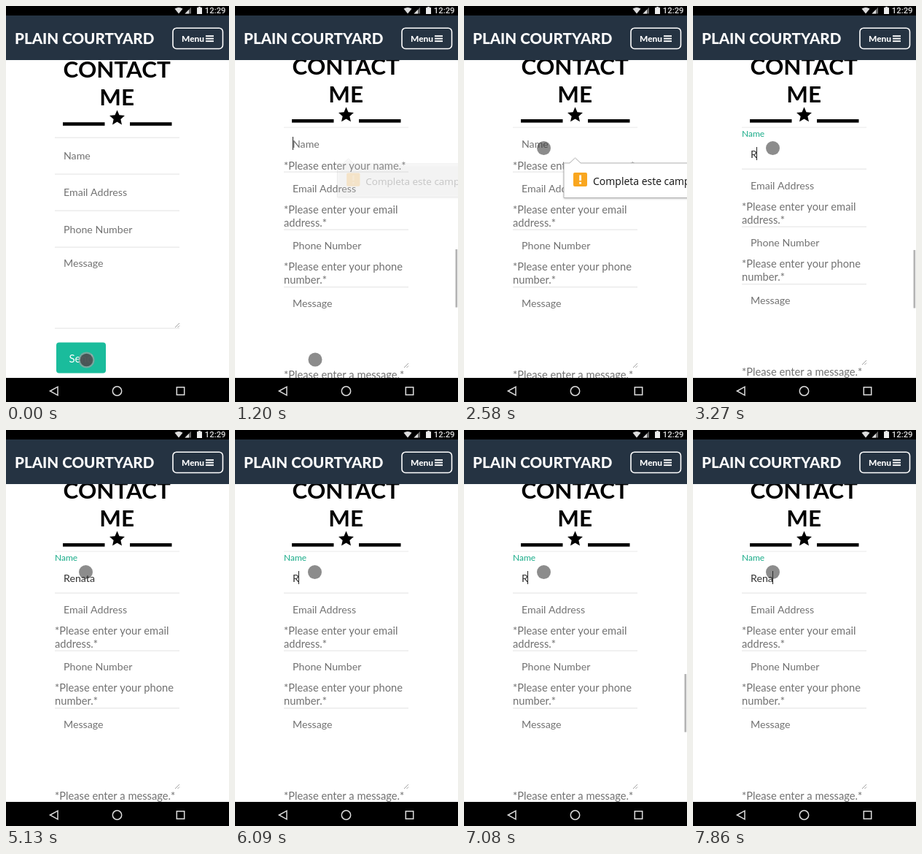
An HTML page with a canvas that plays this animation: 306x542 px, repeating every 8 s.

```html
<!DOCTYPE html>
<html lang="en">
<head>
<meta charset="utf-8">
<title>Contact form</title>
<style>
html, body { margin: 0; width: 100%; height: 100%; overflow: hidden; background: #fff; }
canvas { display: block; width: 306px; height: 542px; }
</style>
</head>
<body>
<canvas id="stage"></canvas>
<script>
const W = 306, H = 542, LOOP = 8000, STEP = 30;
const canvas = document.getElementById('stage');
const ctx = canvas.getContext('2d');
const dpr = window.devicePixelRatio || 1;
canvas.width = W * dpr;
canvas.height = H * dpr;

const LATO = 'Lato, sans-serif';
const FIELD = '14.2px ' + LATO;
const HINT = '14.7px ' + LATO;
const GREY = '#727272';
const TYPED = 'Renata';

// [time, number of letters in the name field]
const KEYS = [
  [3060, 1], [3630, 2], [3810, 3], [4230, 4], [4500, 5], [4650, 6],
  [5370, 5], [5520, 4], [5670, 3], [5820, 2], [5970, 1], [6120, 0],
  [6780, 1], [7410, 2], [7620, 3], [7860, 4]
];

const clamp = v => Math.max(0, Math.min(1, v));
const span = (t, a, b) => clamp((t - a) / (b - a));
const smooth = u => u * u * (3 - 2 * u);
const easeOut = (u, n) => 1 - Math.pow(1 - u, n);

function text(str, x, y, font, color, align = 'left') {
  ctx.font = font;
  ctx.fillStyle = color;
  ctx.textAlign = align;
  ctx.fillText(str, x, y);
}

function rect(x, y, w, h, color) {
  ctx.fillStyle = color;
  ctx.fillRect(x, y, w, h);
}

function roundRect(x, y, w, h, r) {
  ctx.beginPath();
  ctx.roundRect(x, y, w, h, r);
}

function poly(points) {
  ctx.beginPath();
  points.forEach(([x, y]) => ctx.lineTo(x, y));
  ctx.closePath();
}

function disc(x, y, r, color) {
  ctx.beginPath();
  ctx.arc(x, y, r, 0, 7);
  ctx.fillStyle = color;
  ctx.fill();
}

function rule(y, color = '#e9e9e9') {
  rect(67, y - 0.5, 171, 1.3, color);
}

function field(str, mid) {
  text(str, 79, mid + 5, FIELD, GREY);
}

function hint(mid, ...lines) {
  lines.forEach((line, i) => text(line, 67, mid + 5 + i * 18, HINT, GREY));
}

function resizer(y) {
  ctx.strokeStyle = '#8a8a8a';
  ctx.lineWidth = 0.8;
  ctx.beginPath();
  ctx.moveTo(232, y + 3); ctx.lineTo(238, y - 3);
  ctx.moveTo(235.5, y + 3); ctx.lineTo(238, y + 0.5);
  ctx.stroke();
}

function heading(dy) {
  const font = '700 31.4px ' + LATO;
  text('CONTACT', 152.2, 98.4 + dy, font, '#000', 'center');
  text('ME', 152.2, 136 + dy, font, '#000', 'center');
  rect(78, 159.2 + dy, 57.5, 4.6, '#000');
  rect(170, 159.2 + dy, 57.5, 4.6, '#000');
  const star = [];
  for (let i = 0; i < 10; i++) {
    const r = i % 2 ? 5.1 : 11, a = -Math.PI / 2 + i * Math.PI / 5;
    star.push([152.5 + r * Math.cos(a), 153.5 + dy + r * Math.sin(a)]);
  }
  poly(star);
  ctx.fillStyle = '#000';
  ctx.fill();
}

function cleanForm() {
  rule(180); rule(230); rule(280); rule(330); rule(441);
  field('Name', 205);
  field('Email Address', 255);
  field('Phone Number', 306);
  field('Message', 352);
  resizer(437);
  roundRect(69, 460.5, 68, 42, 4);
  ctx.fillStyle = '#1abc9c';
  ctx.fill();
  text('Send', 86.5, 488, '15px ' + LATO, '#fff');
}

// Everything below the name field hangs from its bottom rule.
function checkedForm(y) {
  rule(166, '#efefef');
  rule(y);
  field('Email Address', y + 22.5);
  hint(y + 52, '*Please enter your email', 'address.*');
  rule(y + 79);
  field('Phone Number', y + 101);
  hint(y + 130, '*Please enter your phone', 'number.*');
  rule(y + 157.5);
  field('Message', y + 180);
  resizer(y + 265);
  hint(y + 278.3, '*Please enter a message.*');
  rule(y + 287);
}

function lastKey(t) {
  let key = [1140, 0];
  for (const k of KEYS) if (k[0] <= t) key = k;
  return key;
}

function labelAlpha(t) {
  if (t < 6120) return span(t, 3030, 3270);
  if (t < 6780) return 1 - span(t, 6090, 6210);
  return span(t, 6750, 7080);
}

function nameField(t, key, mid, caretY) {
  const count = key[1];
  const shown = smooth(labelAlpha(t));
  if (shown > 0) {
    ctx.globalAlpha = shown;
    text('Name', 67, 179 + (1 - shown) * 15, '12px ' + LATO, '#18ab88');
    ctx.globalAlpha = 1;
  }
  const value = TYPED.slice(0, count);
  if (count) text(value, 79, mid + 5, FIELD, '#333');
  else field('Name', mid);

  const blinkOn = Math.floor((t - key[0]) / 480) % 2 === 0;
  const quiet = t >= 5130 && t < 5520;
  if (blinkOn && !quiet) {
    ctx.font = FIELD;
    const x = Math.floor(79 + ctx.measureText(value).width);
    rect(x, caretY, 1, 18, '#222');
  }
}

function bubble(t) {
  const u = span(t, 1200, 1380);
  const s = 0.965 + 0.035 * u;
  ctx.save();
  ctx.globalAlpha = 0.2 + 0.8 * u;
  ctx.translate(240, 239);
  ctx.scale(s, s);
  ctx.translate(-240, -239);
  poly([[137, 215], [145, 215], [152.5, 208], [160, 215], [350, 215], [350, 262.5], [137, 262.5]]);
  ctx.shadowColor = 'rgba(0,0,0,0.3)';
  ctx.shadowBlur = 3 * dpr;
  ctx.shadowOffsetY = dpr;
  ctx.fillStyle = '#fff';
  ctx.fill();
  ctx.shadowColor = 'transparent';
  ctx.strokeStyle = '#b4b4b4';
  ctx.lineWidth = 1;
  ctx.stroke();
  roundRect(150, 228, 19, 19, 2);
  ctx.fillStyle = '#f9a61f';
  ctx.fill();
  rect(158.2, 231.5, 2.8, 7.5, '#fff');
  rect(158.2, 240.8, 2.8, 2.8, '#fff');
  text('Completa este campo', 177, 245, '14px "Open Sans", sans-serif', '#111');
  ctx.restore();
}

function scrollAlpha(t) {
  if (t < 1200) return 0;
  if (t < 3060) return 1 - span(t, 1690, 1890);
  if (t < 6120) return 1 - span(t, 3840, 4020);
  return 1 - span(t, 7650, 7830);
}

function scrollbar(t, y) {
  ctx.globalAlpha = scrollAlpha(t);
  rect(302.5, y, 2.7, 79.5, '#b3b3b3');
  ctx.globalAlpha = 1;
}

function pointer(t) {
  if (t < 1200) {
    disc(110.5, 484.5, 11, 'rgba(150,160,160,0.75)');
    disc(110.5, 484.5, 8.8, 'rgba(66,72,74,0.85)');
    return;
  }
  const f = easeOut(span(t, 1600, 1890), 2.7);
  const g = smooth(span(t, 2010, 2130));
  const x = 110 + 8 * clamp(f / 0.585) - 8.5 * g;
  const y = 484 - 304 * f + 14.5 * g;
  disc(x, y, 9.5, 'rgba(50,50,50,0.56)');
}

function statusBar() {
  rect(0, 0, W, 13, '#000');
  ctx.fillStyle = '#ddd';
  ctx.beginPath();
  ctx.moveTo(237, 10.5);
  ctx.lineTo(231.5, 3.8);
  ctx.quadraticCurveTo(237, 0.2, 242.5, 3.8);
  ctx.fill();
  poly([[245.5, 10.5], [254, 10.5], [254, 1.8]]);
  ctx.fillStyle = '#666';
  ctx.fill();
  poly([[245.5, 10.5], [251, 10.5], [251, 4.9]]);
  ctx.fillStyle = '#ddd';
  ctx.fill();
  rect(262, 2.2, 7, 8.8, '#eee');
  rect(264, 1, 3, 1.4, '#eee');
  text('12:29', 301.5, 10, '500 11.3px Roboto, sans-serif', '#ddd', 'right');
}

function navBar() {
  rect(0, 13, W, 61, '#253342');
  text('PLAIN COURTYARD', 12, 51.7, '800 20.6px ' + LATO, '#fff');
  roundRect(229, 30.2, 68.5, 28.3, 5);
  ctx.strokeStyle = '#fff';
  ctx.lineWidth = 1.6;
  ctx.stroke();
  text('Menu', 241, 49, '800 11.9px ' + LATO, '#fff');
  for (let i = 0; i < 3; i++) rect(274, 40.2 + i * 3.5, 11, 1.9, '#fff');
}

function softKeys() {
  rect(0, 509, W, 33, '#000');
  ctx.strokeStyle = '#ddd';
  ctx.lineWidth = 1.5;
  poly([[60.5, 527], [71, 521.2], [71, 532.8]]);
  ctx.stroke();
  ctx.beginPath();
  ctx.arc(152.5, 527, 6.2, 0, 7);
  ctx.stroke();
  ctx.strokeRect(234.3, 521.8, 10.4, 10.4);
}

function draw(t) {
  ctx.setTransform(dpr, 0, 0, dpr, 0, 0);
  rect(0, 0, W, H, '#fff');
  if (t < 1200) {
    heading(0);
    cleanForm();
  } else {
    const key = lastKey(t);
    heading(-4.2);
    if (key[1]) {
      checkedForm(223);
      nameField(t, key, 203, 193);
      scrollbar(t, 334);
    } else if (t < 3060) {
      checkedForm(227);
      nameField(t, key, 189, 179);
      hint(219, '*Please enter your name.*');
      scrollbar(t, 333);
      bubble(t);
    } else {
      checkedForm(216.3);
      nameField(t, key, 192, 183);
      scrollbar(t, 334.5);
    }
  }
  pointer(t);
  statusBar();
  navBar();
  softKeys();
}

const start = performance.now();
function tick() {
  const t = (performance.now() - start) % LOOP;
  draw(Math.floor(t / STEP) * STEP);
  requestAnimationFrame(tick);
}
tick();
</script>
</body>
</html>
```
